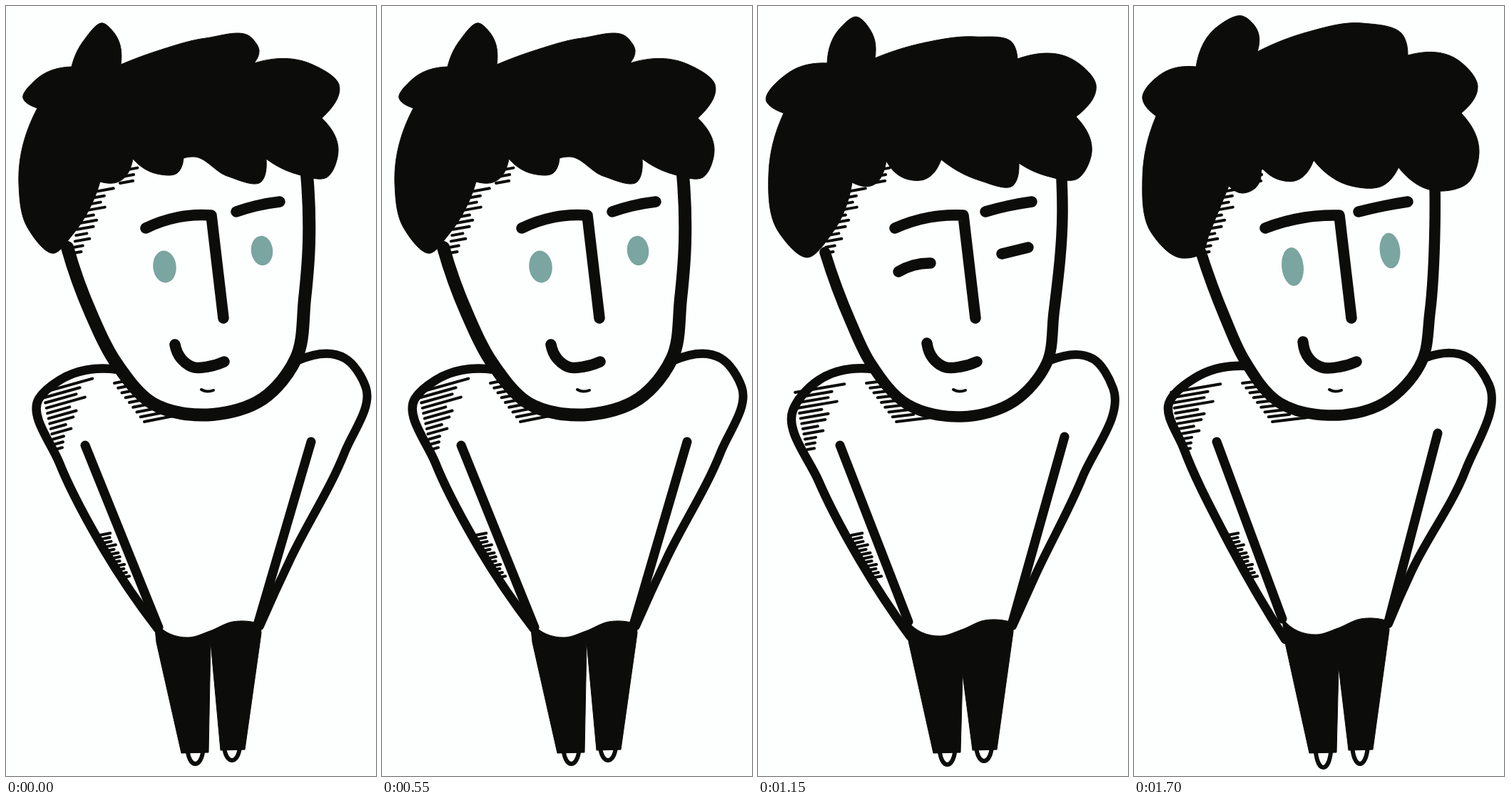
These frames come from a looping animation (519x1078 px, 1.85 s). An HTML page:

```html
<!DOCTYPE html>
<html lang="en">
<head>
<meta charset="utf-8">
<title>Shy guy</title>
<style>
  html, body { margin: 0; width: 100%; height: 100%; overflow: hidden; background: #fdfefe; }
  svg { display: block; width: 100%; height: 100%; }
  .line { fill: none; stroke: #0c0d0a; stroke-linecap: round; stroke-linejoin: round; }
  .ink { fill: #0c0d0a; stroke: #0c0d0a; stroke-width: 1; stroke-linejoin: round; }
  .skin { fill: #fdfefe; }
  .eye { fill: #7aa5a0; }
</style>
</head>
<body>
<svg id="stage" viewBox="0 0 519 1078" preserveAspectRatio="none"></svg>
<script>
// Key points of smooth curves; "/" marks a corner.
const poses = {
  rest: {
    hair: '92,85 / 110,47 136,24 152,38 161,82 / 218,61 280,45 345,45 355,62 348,80 / 430,82 467,110 443,157 / 466,203 450,240 410,236 365,214 / 358,246 310,238 262,211 249,213 / 240,234 212,235 178,214 / 158,246 132,246 / 92,322 68,346 30,310 18,250 44,143 / 24,129 42,103 92,85',
    face: '86,338 119,430 156,502 205,556 290,572 360,550 407,493 419,410 425,330 422,236',
    faceWidth: 18,
    left: '157,509 75,524 46,550 75,640 128,745 213,872',
    right: '410,496 475,493 505,535 475,625 400,772 356,868',
    arms: ['111,615 214,870', '428,610 353,866'],
    hem: 3, crotch: 890, toe: 1061,
    brows: [196, 323], mouth: [474, 306], eye: [16.2, 22.5], slope: .28
  },
  lean: {
    hair: '87,85 / 118,28 152,14 173,34 173,64 / 245,36 320,24 378,42 384,69 / 455,76 482,112 459,150 / 484,205 468,248 425,259 371,226 / 350,251 305,252 252,216 / 225,245 203,243 178,225 / 170,255 152,262 133,252 / 106,318 94,347 68,353 24,317 12,240 31,154 / 12,130 40,94 87,85',
    face: '94,345 128,437 154,494 205,556 272,573 350,556 404,497 415,430 422,310 422,250',
    faceWidth: 15.5,
    left: '158,504 85,521 49,556 70,620 127,740 212,887',
    right: '410,492 468,492 498,530 465,650 390,790 357,865',
    arms: ['116,610 208,858', '426,598 357,862'],
    hem: -1, crotch: 925, toe: 1066,
    brows: [184, 315], mouth: [470, 312], eye: [15.3, 27], slope: .17
  },
  blink: {
    hair: '97,80 / 116,30 137,15 160,38 164,73 / 235,51 305,43 358,53 364,74 / 445,77 474,110 446,155 / 468,205 448,242 405,238 366,220 / 358,251 310,244 257,215 / 233,243 205,241 180,217 / 158,252 132,247 / 104,318 70,352 28,315 15,235 36,150 / 12,134 45,92 97,80',
    face: '94,345 130,442 158,500 210,558 285,575 360,553 405,500 415,430 427,290 426,243',
    faceWidth: 15.5,
    left: '160,508 85,524 49,566 85,665 143,776 213,882',
    right: '410,496 470,494 498,535 455,660 390,795 357,868',
    arms: ['115,615 211,862', '430,603 356,866'],
    hem: 1, crotch: 935, toe: 1062,
    brows: [192, 319], mouth: [472, 307], slope: .17
  },
  look: {
    hair: '88,87 / 116,32 145,17 167,38 167,70 / 235,47 305,38 366,51 375,72 / 448,77 479,115 454,148 / 485,205 468,246 428,253 367,224 / 352,252 305,247 252,208 / 235,241 207,241 181,220 / 163,256 145,259 127,248 / 95,322 62,349 27,312 17,240 36,152 / 15,127 36,92 88,87',
    face: '91,338 140,465 160,500 215,560 295,574 360,549 404,502 413,430 421,248',
    faceWidth: 15.5,
    left: '157,507 80,525 47,557 65,625 / 215,895',
    right: '410,492 470,491 500,535 470,635 400,785 360,870',
    arms: ['115,612 206,855', '424,604 357,862'],
    hem: -2, crotch: 933, toe: 1066,
    brows: [184, 316], mouth: [470, 312], eye: [15.5, 27], slope: .2
  }
};

const order = 'rest blink look lean rest look lean rest blink lean look rest lean'.split(' ');
const hold = name => name === 'blink' ? 100 : 150;
const loop = order.reduce((sum, name) => sum + hold(name), 0);

const mix = (a, b, t) => a + (b - a) * t;

// Chord-length spline through the points of one smooth stretch.
function stretch(p) {
  const h = p.slice(1).map((q, i) => Math.hypot(q[0] - p[i][0], q[1] - p[i][1]));
  const dir = h.map((len, i) => p[i].map((v, k) => (p[i + 1][k] - v) / len));
  const last = h.length;
  const m = p.map((_, i) => i && i < last &&
    [0, 1].map(k => mix(dir[i - 1][k], dir[i][k], h[i - 1] / (h[i - 1] + h[i]))));
  const end = (d, near) => last > 1 ? d.map((v, k) => 2 * v - near[k]) : d;
  m[0] = end(dir[0], m[1]);
  m[last] = end(dir[last - 1], m[last - 1]);
  return h.map((len, i) => 'C' + [
    p[i].map((v, k) => v + m[i][k] * len / 3),
    p[i + 1].map((v, k) => v - m[i + 1][k] * len / 3),
    p[i + 1]
  ]).join('');
}

function curve(text) {
  let d = '', last = null;
  for (const part of text.split(' / ')) {
    const p = part.split(' ').map(t => t.split(',').map(Number));
    if (last) p.unshift(last);
    else d = 'M' + p[0];
    if (p.length > 1) d += stretch(p);
    last = p[p.length - 1];
  }
  return d;
}

// Strokes leave the edge from-to with a wavering length.
function hatch(count, from, to, long, short, slope) {
  let d = '';
  for (let i = 0; i < count; i++) {
    const t = i / (count - 1);
    const len = mix(long, short, t) * (.85 + .2 * Math.sin(i * 2.4 + 1));
    d += `M${mix(from[0], to[0], t)},${mix(from[1], to[1], t)}l${len},${-len * slope}`;
  }
  return d;
}

function foot(x, top, toe) {
  const pull = top + (toe - top) / .75;
  return `M${x - 10.5},${top}C${x - 7},${pull} ${x + 7},${pull} ${x + 10.5},${top}`;
}

function pants(hem, crotch) {
  const y = v => v + hem;
  return curve(`208,${y(858)} 230,${y(876)} 256,${y(881)} 286,${y(872)} 318,${y(859)} 357,${y(862)}` +
    ` / 358,${y(875)} / 335,1041 / 301,1042 / 287,${crotch} / 284,1045 / 246,1046 / 211,${y(888)}`) + 'Z';
}

function add(parent, tag, attrs) {
  const node = document.createElementNS('http://www.w3.org/2000/svg', tag);
  for (const key in attrs) node.setAttribute(key, attrs[key]);
  return parent.appendChild(node);
}

function draw(pose) {
  const g = add(document.getElementById('stage'), 'g', { visibility: 'hidden' });
  const shape = (cls, d) => add(g, 'path', { class: cls, d });
  const line = (d, width) => add(g, 'path', { class: 'line', d, 'stroke-width': width });
  const eye = (cx, cy, rx, ry) =>
    add(g, 'ellipse', { class: 'eye', cx, cy, rx, ry, transform: `rotate(-6 ${cx} ${cy})` });
  const { slope, toe } = pose;

  line(hatch(12, [52, 541], [69, 621], 68, 10, slope), 4);
  line(hatch(9, [152, 528], [194, 582], 28, 46, slope * .7), 4);
  line(hatch(12, [131, 741], [164, 800], 15, 9, .2), 4);
  line(foot(265.5, 1045, toe), 6);
  line(foot(317, 1041, toe - 5), 6);
  line(curve(pose.left), 12.5);
  line(curve(pose.right), 12);
  pose.arms.forEach(arm => line(curve(arm), 13));
  shape('ink', pants(pose.hem, pose.crotch));

  const face = curve(pose.face);
  shape('skin', face);
  line(hatch(3, [160, 231], [160, 248], 24, 24, .18), 4);
  line(hatch(11, [108, 263], [94, 346], 42, 14, .18), 4);
  line(face, pose.faceWidth);
  shape('ink', curve(pose.hair) + 'Z');

  const [brow, farBrow] = pose.brows;
  const [mouthTop, mouthEnd] = pose.mouth;
  const features = [
    `${brow},311 240,296 288,293 / 305,437`,
    `${farBrow},288 350,280 384,274`,
    `237,${mouthTop} 246,494 264,506 ${mouthEnd - 23},505 ${mouthEnd},498`
  ];
  if (pose.eye) {
    const [rx, ry] = pose.eye;
    eye(222.5, 365, rx, ry);
    eye(359, 342.5, rx - 1, ry * .92);
  } else {
    features.push('197,372 218,363 242,360', '342,347 379,338');
  }
  features.forEach(f => line(curve(f), 15.5));
  line(curve('274,537 282,539.5 291,538'), 4);
  return g;
}

const figures = {};
for (const name in poses) figures[name] = draw(poses[name]);

function poseAt(t) {
  return order.find(name => (t -= hold(name)) < 0);
}

const start = performance.now();
function tick() {
  const now = poseAt((performance.now() - start) % loop);
  for (const name in figures)
    figures[name].setAttribute('visibility', name === now ? 'visible' : 'hidden');
  requestAnimationFrame(tick);
}
tick();
</script>
</body>
</html>
```
